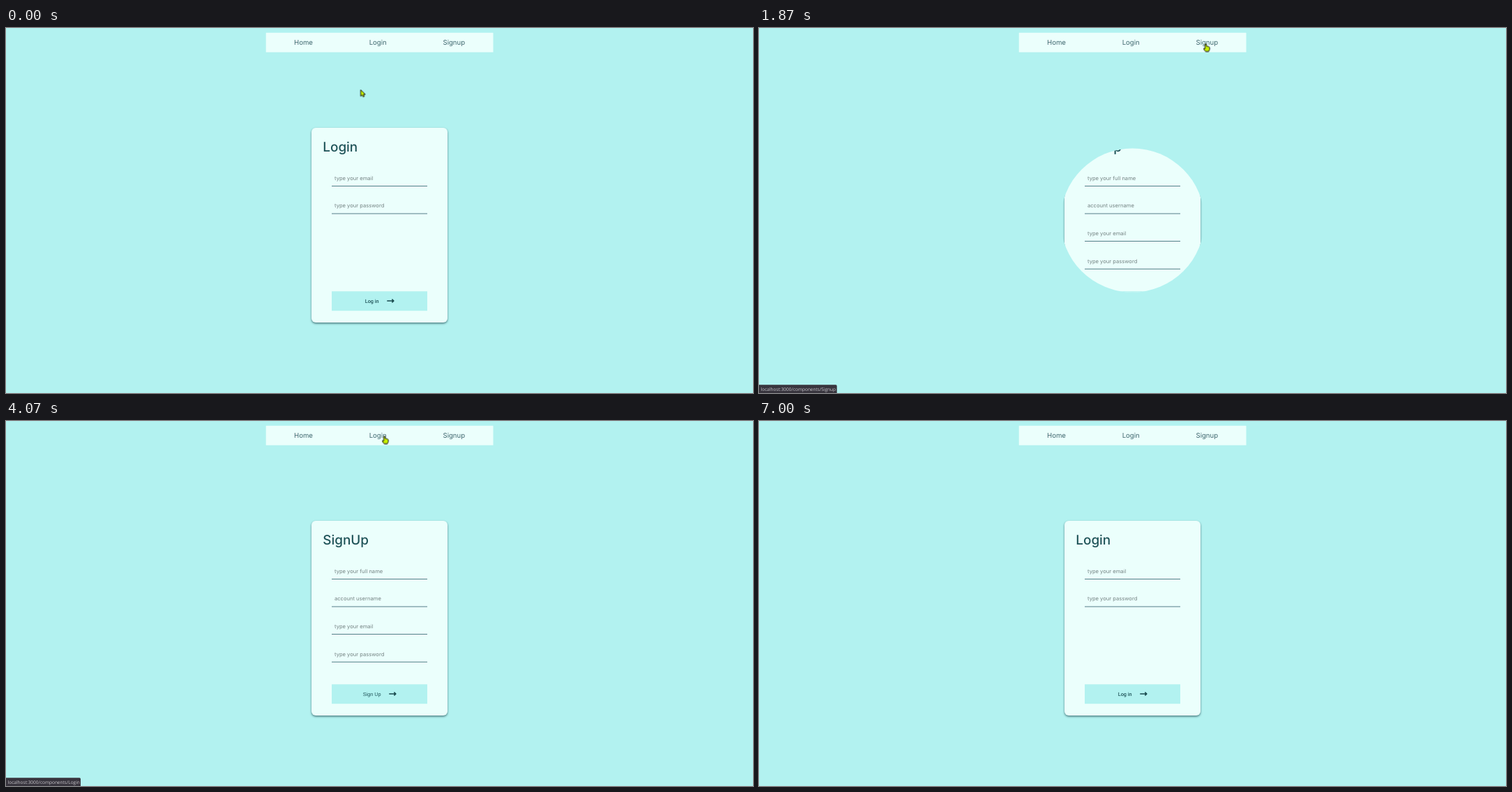
Recreate the animation shown at these times as an HTML page. Size 1071x523 px, loop 8.27 s.

```html
<!DOCTYPE html>
<html lang="en">
<head>
<meta charset="utf-8">
<title>Login and signup</title>
<style>
  :root { --loop: 8270ms; --sky: #b2f2f0; --mint: #ebfffc; --ink: #1f5358; }
  html, body { margin: 0; width: 100%; height: 100%; overflow: hidden; background: var(--sky); }
  svg { position: absolute; left: 0; top: 0; width: 1071px; height: 523px; overflow: visible; }
  text { text-rendering: geometricPrecision; }

  .card {
    position: absolute; left: 438px; top: 143px; width: 195px; height: 279px;
    border-radius: 6px; background: var(--mint);
    box-shadow: 0 1.5px 3px rgba(0, 40, 50, .6);
    animation: var(--loop) linear infinite;
  }
  .card svg { left: -438px; top: -143px; }
  .login { animation-name: login; }
  .signup { animation-name: signup; }

  .title { font: 500 18.9px Inter, sans-serif; fill: var(--ink); }
  .nav { font: 400 9.6px Inter, sans-serif; fill: #40676f; }
  .hint { font: 400 7.6px Inter, sans-serif; fill: #758384; }
  .action { font: 500 7.3px Roboto, sans-serif; fill: var(--ink); }
  .plain { font: 400 7.3px "Liberation Sans", sans-serif; }
  .link { font: 400 6.5px "Open Sans", sans-serif; fill: #c9c7cc; }
  .rule { stroke: #557d88; stroke-width: 1; }
  .arrow { fill: none; stroke: #17474b; stroke-width: 1.5; }

  .mouse { animation: move var(--loop) linear infinite; }
  .mouse path { fill: #c6f000; stroke: #111; stroke-width: 1; stroke-linejoin: round; }
  .pointer, .hand, .tip1, .tip2 { animation: var(--loop) step-end infinite; }
  .pointer { animation-name: pointer; }
  .hand { animation-name: hand; }
  .tip1 { animation-name: tip1; }
  .tip2 { animation-name: tip2; }

  /* A small circle drops from the top edge, then grows over the card */
  @keyframes signup {
    0% { clip-path: circle(0% at 50% 0%); animation-timing-function: step-end; }
    17.727% { clip-path: circle(5% at 50% 0%); }
    21.112% { clip-path: circle(30% at 50% 50%); animation-timing-function: ease; }
    29.577% { clip-path: circle(82% at 50% 40%); animation-timing-function: step-end; }
    29.6% { clip-path: circle(200% at 50% 40%); animation-timing-function: step-end; }
    51.632%, 100% { clip-path: circle(0% at 50% 0%); }
  }
  @keyframes login {
    0% { clip-path: circle(200% at 50% 40%); animation-timing-function: step-end; }
    17.727% { clip-path: circle(0% at 50% 0%); animation-timing-function: step-end; }
    51.632% { clip-path: circle(5% at 50% 0%); }
    55.018% { clip-path: circle(30% at 50% 50%); animation-timing-function: ease; }
    63.482% { clip-path: circle(82% at 50% 40%); animation-timing-function: step-end; }
    63.5%, 100% { clip-path: circle(200% at 50% 40%); }
  }
  @keyframes move {
    0%, 3.99% { transform: translate(508.5px, 88.5px); animation-timing-function: ease-in-out; }
    11.6%, 29.87% { transform: translate(640.5px, 22.5px); animation-timing-function: ease-out; }
    31.44%, 33.13% { transform: translate(561px, 25px); animation-timing-function: ease-in-out; }
    41.96% { transform: translate(513.5px, 142.5px); animation-timing-function: ease-in-out; }
    48.37%, 51.9% { transform: translate(542.5px, 21.5px); }
    54.78% { transform: translate(624.5px, 86px); animation-timing-function: ease-out; }
    61%, 80.65% { transform: translate(659.5px, 101.5px); }
    83.8%, 100% { transform: translate(154.5px, 213.5px); }
  }
  @keyframes pointer {
    0%, 30.23%, 52.36% { visibility: visible; }
    11.19%, 46.8%, 84.4%, 100% { visibility: hidden; }
  }
  @keyframes hand {
    0%, 30.23%, 52.36%, 100% { visibility: hidden; }
    11.19%, 46.8% { visibility: visible; }
  }
  @keyframes tip1 {
    0%, 34.7%, 100% { visibility: hidden; }
    14.51% { visibility: visible; }
  }
  @keyframes tip2 {
    0%, 58.89%, 100% { visibility: hidden; }
    48.37% { visibility: visible; }
  }
</style>
</head>
<body>
<div class="card login"><svg>
  <text class="title" x="454.3" y="177.3">Login</text>
  <text class="hint" x="471" y="217.7">type your email</text>
  <text class="hint" x="471" y="257.4">type your password</text>
  <path class="rule" d="M467 226.5H604M467 266H604"/>
  <rect x="467" y="377.3" width="137" height="27.9" fill="#b2f2f0"/>
  <text class="action" x="514.7" y="393.6">Log in</text>
  <path class="arrow" d="M546.3 391H556M553.4 388.6L555.8 391L553.4 393.4"/>
</svg></div>

<div class="card signup"><svg>
  <text class="title" x="454.3" y="177.3">SignUp</text>
  <text class="hint" x="471" y="217.7">type your full name</text>
  <text class="hint" x="471" y="257.4">account username</text>
  <text class="hint" x="471" y="297.1">type your email</text>
  <text class="hint" x="471" y="336.8">type your password</text>
  <path class="rule" d="M467 226.5H604M467 266H604M467 305.5H604M467 345.3H604"/>
  <rect x="467" y="377.3" width="137" height="27.9" fill="#b2f2f0"/>
  <text class="action plain" x="511.7" y="393.6">Sign Up</text>
  <path class="arrow" d="M549.3 391H559M556.4 388.6L558.8 391L556.4 393.4"/>
</svg></div>

<svg>
  <rect x="372.7" y="6.8" width="325.8" height="27.9" fill="#ebfffc"/>
  <g class="nav" text-anchor="middle">
    <text x="426.5" y="24.2">Home</text>
    <text x="533.2" y="24.2">Login</text>
    <text x="642.3" y="24.2">Signup</text>
  </g>
  <g class="tip1">
    <path d="M0 511.3H110Q111.7 511.3 111.7 513V523H0Z" fill="#38353e"/>
    <text class="link" x="2.7" y="519.7">localhost:3000/components/Signup</text>
  </g>
  <g class="tip2">
    <path d="M0 511.3H105.3Q107 511.3 107 513V523H0Z" fill="#38353e"/>
    <text class="link" x="2.7" y="519.7">localhost:3000/components/Login</text>
  </g>
  <g class="mouse">
    <path class="pointer" d="M0 0V9.3L2.2 7.4L3.6 10.2L5.3 9.4L4 6.7H6.8Z"/>
    <path class="hand" d="M-1 6V.9Q0 -.4 1 .9V3.5L4.4 4.2Q5.6 4.6 5.6 6V8.2L4.4 11H-.4L-2.9 8Q-3.6 6.4 -2.3 6.4L-1 7.4Z"/>
  </g>
</svg>
</body>
</html>
```
